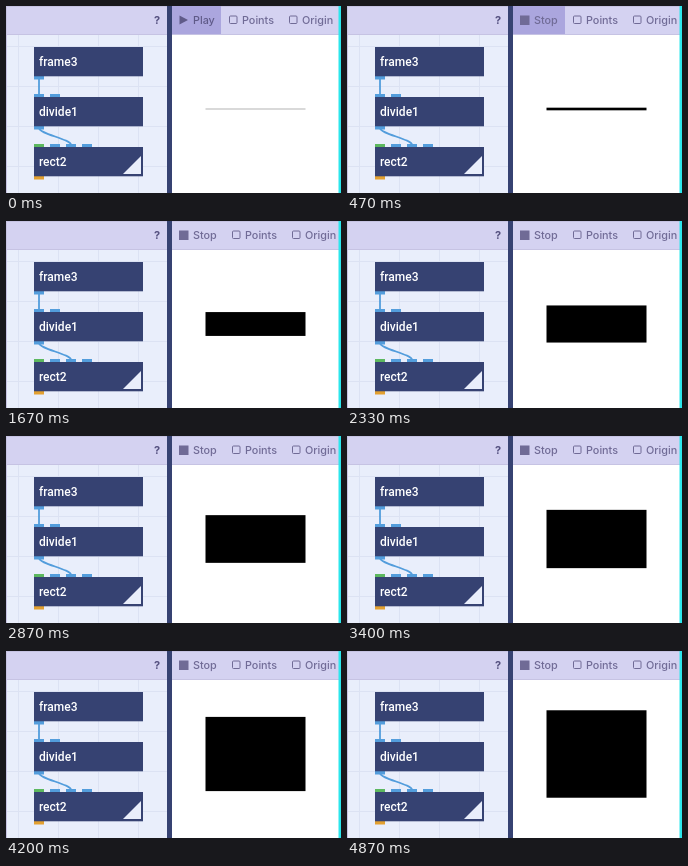
Write an HTML page with a canvas that moves like this. It is 335x187 px and loops after 4.94 s.

```html
<!DOCTYPE html>
<html lang="en">
<head>
<meta charset="utf-8">
<title>Node editor</title>
<style>
html, body { margin: 0; width: 100%; height: 100%; overflow: hidden; background: #fff; }
canvas { display: block; width: 335px; height: 187px; }
</style>
</head>
<body>
<canvas id="stage"></canvas>
<script>
const W = 335, H = 187, LOOP = 4940;
const START = 330, STEP = 200 / 3, GROWTH = 1.325;
const NAVY = '#364272', BLUE = '#539ddc', PAPER = '#e9eefb', GRID = '#dce2f3';
const BAR = '#d4d2f1', EDGE = '#c6c3e3', INK = '#706b96', LIT_INK = '#5f5a88';
const UI_FONT = '500 10.8px Inter, sans-serif';

const canvas = document.getElementById('stage');
const ctx = canvas.getContext('2d');
const dpr = window.devicePixelRatio || 1;
canvas.width = Math.round(W * dpr);
canvas.height = Math.round(H * dpr);

function box(x, y, w, h, color) {
  ctx.fillStyle = color;
  ctx.fillRect(x, y, w, h);
}

function label(text, x, y, font, color) {
  ctx.font = font;
  ctx.fillStyle = color;
  ctx.fillText(text, x, y);
}

function polygon(points, color) {
  ctx.beginPath();
  points.forEach(([x, y]) => ctx.lineTo(x, y));
  ctx.fillStyle = color;
  ctx.fill();
}

function bar(x, w) {
  box(x, 0, w, 28, BAR);
  box(x, 0, w, 1, EDGE);
  box(x, 28, w, 1, EDGE);
}

function node(name, y, inputs, output) {
  inputs.forEach((color, i) => box(28 + i * 16, y - 3, 10, 3, color));
  box(28, y + 29, 10, 3.5, output);
  box(28, y, 109, 29.3, NAVY);
  label(name, 33, y + 19, '500 12px Roboto, sans-serif', '#fff');
}

function drawNetwork() {
  box(0, 0, 162, H, PAPER);
  for (let x = 12; x < 162; x += 40) box(x, 28, 1, H, GRID);
  for (let y = 40; y < H; y += 40) box(0, y, 162, 1, GRID);
  bar(0, 162);
  box(0, 0, 1, H, EDGE);
  label('?', 148, 18, '700 11px Inter, sans-serif', '#555180');

  node('frame3', 41, [], BLUE);
  node('divide1', 91, [BLUE, BLUE], BLUE);
  node('rect2', 141, ['#5cb85f', BLUE, BLUE, BLUE], '#e3a02f');
  polygon([[117, 168], [135, 150], [135, 168]], PAPER);

  ctx.strokeStyle = BLUE;
  ctx.lineWidth = 1.8;
  ctx.beginPath();
  ctx.moveTo(33, 72);
  ctx.lineTo(33, 89);
  ctx.moveTo(33, 122);
  ctx.bezierCurveTo(33, 128, 65, 133, 65, 139);
  ctx.stroke();
  box(161, 0, 5, H, NAVY);
}

function checkbox(text, x) {
  ctx.strokeStyle = INK;
  ctx.lineWidth = 1;
  ctx.beginPath();
  ctx.roundRect(x + 0.5, 10, 7.5, 7.5, 1);
  ctx.stroke();
  label(text, x + 13, 18, UI_FONT, INK);
}

// The button stays lit for a moment after the click.
function hoverAmount(t) {
  return t < START ? 1 : Math.max(0, Math.min(1, (800 - t) / 200));
}

function drawToolbar(t) {
  const playing = t >= START;
  ctx.save();
  ctx.beginPath();
  ctx.rect(166, 0, 164.5, 28);
  ctx.clip();
  ctx.globalAlpha = hoverAmount(t);
  box(166, 0, playing ? 52 : 49, 28, '#aba6de');
  ctx.globalAlpha = 1;
  if (playing) box(173, 9.5, 9.5, 9.5, INK);
  else polygon([[173.5, 9.5], [182, 14], [173.5, 18.5]], LIT_INK);
  label(playing ? 'Stop' : 'Play', 187, 18, UI_FONT, playing ? INK : LIT_INK);
  checkbox('Points', playing ? 226 : 223);
  checkbox('Origin', playing ? 286 : 283);
  ctx.restore();
}

// Height grows in even ticks, with one short stall.
function rectHeight(t) {
  const n = Math.floor((t - START + 3) / STEP);
  const ticks = n <= 18 ? n : Math.max(18, n - 2);
  return Math.max(0.3, ticks * GROWTH);
}

function drawViewer(t) {
  box(166, 0, 169, H, '#fff');
  bar(166, 167);
  drawToolbar(t);
  box(332.5, 0, 2.5, H, '#2ce6ec');
  const h = rectHeight(t);
  box(199.5, 103 - h / 2, 100, h, '#000');
}

function frame(now) {
  ctx.setTransform(dpr, 0, 0, dpr, 0, 0);
  drawNetwork();
  drawViewer(now % LOOP);
}

const origin = performance.now();
function tick() {
  frame(Math.max(0, performance.now() - origin));
  requestAnimationFrame(tick);
}
tick();
</script>
</body>
</html>
```
